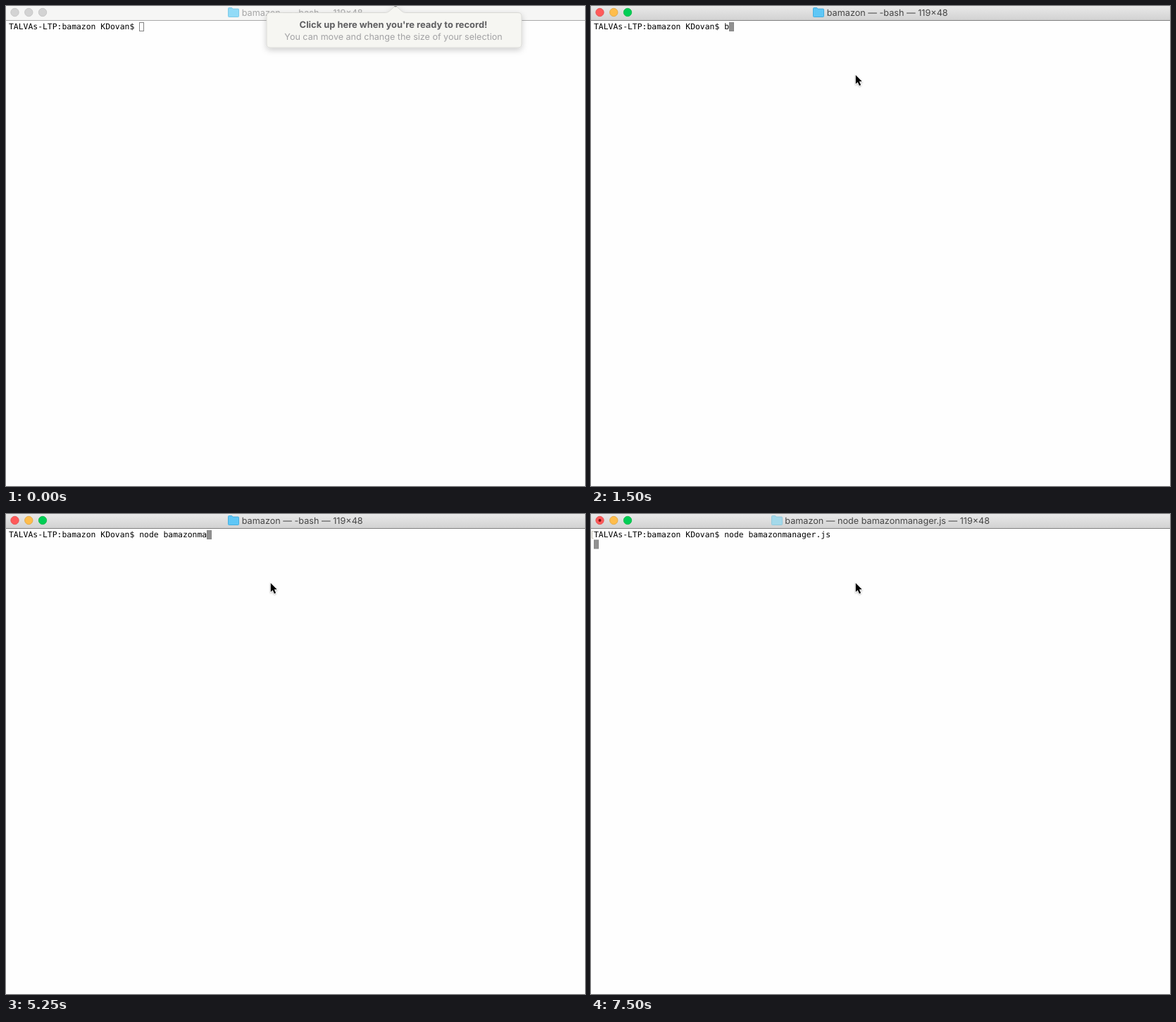
Write an HTML page that moves like this. It is 822 px wide and 681 px high and loops after 8 s.

```html
<!DOCTYPE html>
<html lang="en">
<head>
<meta charset="utf-8">
<title>Terminal session</title>
<style>
  html, body { margin: 0; width: 822px; height: 681px; overflow: hidden; background: #fefefe; }
  svg { display: block; }
  text { text-rendering: geometricPrecision; white-space: pre; }
  .mono { font: 11.4px "DejaVu Sans Mono", monospace; fill: #000; }
  .ui { font: 12.65px Inter, sans-serif; text-anchor: middle; }
  #title { fill: #464646; }
  #bar { fill: url(#chrome); }
  #rule { fill: #7f7f7f; }
  #folder { fill: #5fc7f6; stroke: #45aee0; }
  .light { stroke-width: .8; }
  .red { fill: #ff5a5a; stroke: #e2494a; }
  .amber { fill: #ffbd4c; stroke: #e0a33c; }
  .green { fill: #00ce55; stroke: #0eb546; }
  .idle #bar { fill: #f6f6f5; }
  .idle #rule { fill: #a9a9a9; }
  .idle #title { fill: #a6a6a6; }
  .idle #folder { fill: #92dbf7; stroke: #7fcbe9; }
  .idle .light { fill: #d3d3d3; stroke: #c0c0c0; }
  .idle #caret { fill: none; stroke: #858585; }
  #caret { fill: #919191; stroke: #878787; }
  .pale #folder { fill: #a4d9ea; stroke: #92cadd; }
</style>
</head>
<body>
<svg id="stage" width="822" height="681" viewBox="0 0 822 681">
  <defs>
    <linearGradient id="chrome" x2="0" y2="1">
      <stop stop-color="#e9e9e9"/><stop offset="1" stop-color="#d2d2d2"/>
    </linearGradient>
    <filter id="soft" x="-20%" y="-60%" width="140%" height="240%">
      <feDropShadow dx="0" dy="3" stdDeviation="4" flood-color="#000" flood-opacity=".2"/>
    </filter>
    <filter id="lift" x="-50%" y="-50%" width="200%" height="200%">
      <feDropShadow dx="0" dy="1" stdDeviation=".9" flood-color="#000" flood-opacity=".35"/>
    </filter>
  </defs>

  <rect width="822" height="681" fill="#fefefe"/>
  <rect id="bar" width="822" height="20"/>
  <rect id="rule" y="20" width="822" height="1"/>
  <circle class="light red" cx="12.5" cy="9" r="5.7"/>
  <circle class="light amber" cx="32.3" cy="9" r="5.7"/>
  <circle class="light green" cx="52" cy="9" r="5.7"/>
  <circle id="busy" cx="12.5" cy="9" r="2" fill="#7a1010"/>
  <path id="folder" d="M.5 3.5q0-1 1-1h4.2l1.5 1.6h7.3q1 0 1 1v9.4q0 1-1 1h-13q-1 0-1-1z"/>
  <text id="title" class="ui" x="420.7" y="13.7"></text>

  <path id="bracket" d="M3.5 24.5h-2v10h2" fill="none" stroke="#c3c0b2"/>
  <text class="mono" x="4" y="33.2">TALVAs-LTP:bamazon KDovan$ <tspan id="command"></tspan></text>
  <rect id="caret" width="6" height="12"/>

  <g id="callout">
    <path filter="url(#soft)" fill="#f6f6f2" stroke="#d2d2cf" stroke-width=".8"
      d="M375 9.5H538q4 0 6-2l9-8l9 8q2 2 6 2H727q5 0 5 5V54q0 5-5 5H375q-5 0-5-5V14.5q0-5 5-5z"/>
    <circle cx="553" cy="-.8" r="2.2" fill="#8d8d8d"/>
    <text class="ui" x="550" y="31.3" fill="#5f5f61" style="font-size:12.9px;font-weight:700">Click up here when you're ready to record!</text>
    <text class="ui" x="550" y="48.2" fill="#a2a2a4" style="font-size:12.55px">You can move and change the size of your selection</text>
  </g>

  <path id="pointer" filter="url(#lift)" stroke="#fff" stroke-width="1.2" paint-order="stroke"
    d="M.8 1V13.6L3.7 10.9L5.9 15.9L8.1 14.9L5.9 10.1H9.7z"/>
</svg>
<script>
  const LOOP = 8000, CELL = 6.863;
  const RUN = "node bamazonmanager.js";
  const $ = id => document.getElementById(id);

  // [start ms, characters typed]
  const firstTry = [[0, 0], [1500, 1], [1750, 2], [2000, 3], [2500, 1], [2750, 0]];
  const secondTry = [[3000, 2], [3250, 4], [3500, 5], [3750, 7], [4000, 9], [4250, 11],
    [4500, 12], [5250, 14], [5500, 16], [5750, 18], [6000, 19], [6500, 20], [6750, 22]];

  const typedAt = (steps, t) => steps.filter(([start]) => start <= t).pop()[1];
  const show = (id, on) => $(id).style.display = on ? "" : "none";
  const place = (id, x, y) => $(id).setAttribute("transform", `translate(${x} ${y})`);

  function render(t) {
    const entered = t >= 7000, running = t >= 7250;
    const command = t < 3000
      ? "bam".slice(0, typedAt(firstTry, t))
      : RUN.slice(0, typedAt(secondTry, t));

    $("stage").classList.toggle("idle", t < 500);
    $("stage").classList.toggle("pale", t >= 7500);
    $("title").textContent = `bamazon — ${running ? RUN : "-bash"} — 119×48`;
    place("folder", running ? 256 : 315, 0);
    show("busy", running);

    $("command").textContent = command;
    show("bracket", entered);
    if (entered) place("caret", 4.5, 37);
    else place("caret", Math.round(4 + CELL * (27 + command.length)) + .5, 23.5);

    show("callout", t < 250);
    show("pointer", t >= 250);
    place("pointer", 375, t < 500 ? 89 : 97);
  }

  const begin = performance.now();
  function tick() {
    render((performance.now() - begin) % LOOP);
    requestAnimationFrame(tick);
  }
  render(0);
  requestAnimationFrame(tick);
</script>
</body>
</html>
```
